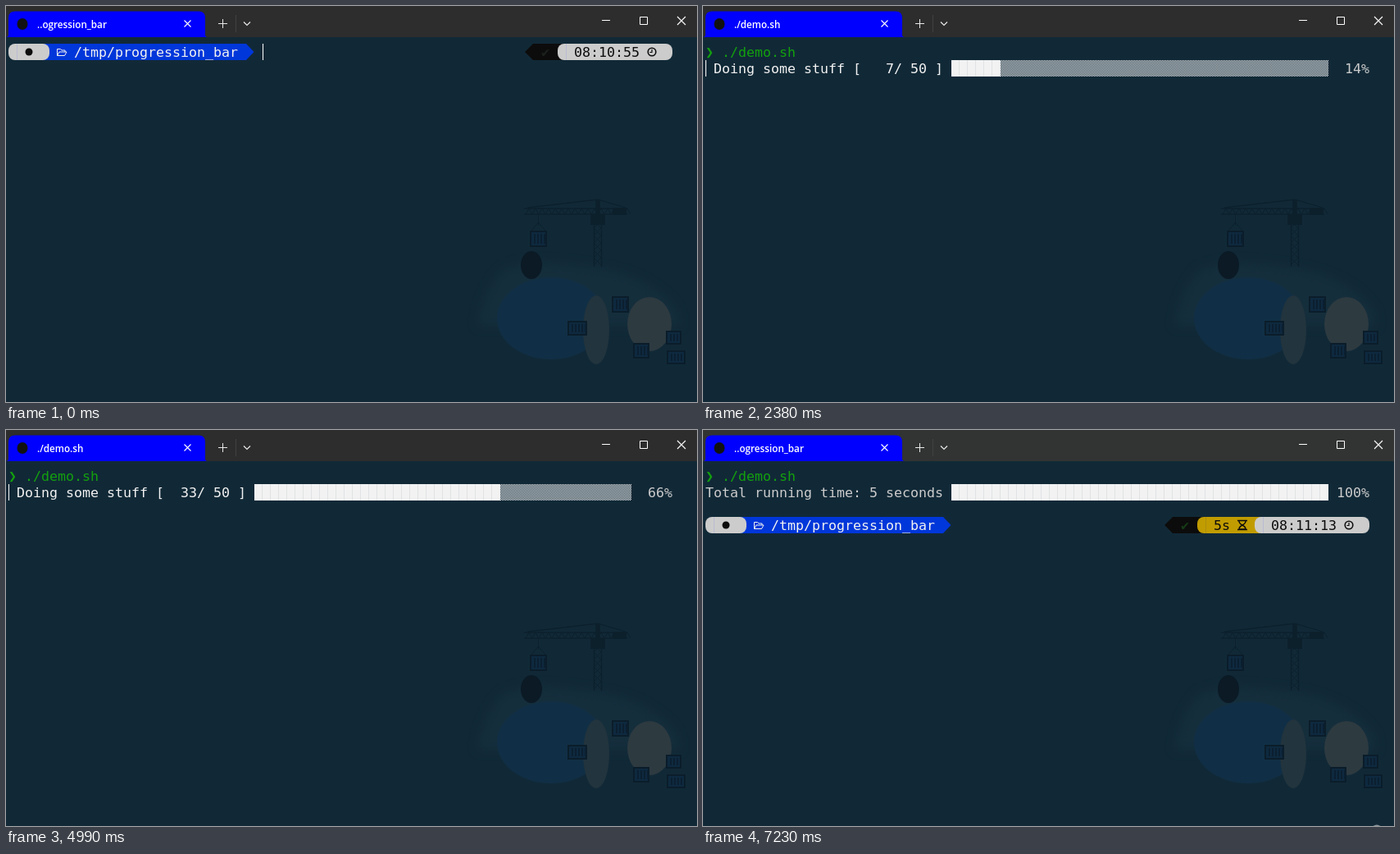
These frames come from a looping animation (843 by 483 pixels, 7.39 s). An HTML page with a canvas:

```html
<!DOCTYPE html>
<html lang="en">
<head>
<meta charset="utf-8">
<title>Progress bar</title>
<style>
  html, body { margin: 0; width: 100%; height: 100%; overflow: hidden; background: #112937; }
  canvas { display: block; }
</style>
</head>
<body>
<canvas id="stage" width="843" height="483"></canvas>
<script>
const LOOP = 7390, CELL = 10, ROW = 20, LEFT = 3, TOP = 46;
const WHITE = '#f2f2f2', GRAY = '#cccccc', GREEN = '#13a10e', RED = '#c50f1f',
      BLUE = '#0037da', BLACK = '#0c0c0c', YELLOW = '#c19c00', BACK = '#112937';
const COMMAND = './demo.sh';
const KEYS = [60, 260, 460, 660, 760, 860, 1240, 1440, 1520];
const START = 1780, SUMMARY = 6825, PROMPT = 6890, BLUR = 7230;

// Bursts of counter ticks: first time, last time, ticks
const BURSTS = [
  [1780, 2040, 4], [2180, 2450, 4], [2590, 3060, 6], [3200, 3660, 6], [3810, 4460, 8],
  [4600, 4990, 5], [5130, 5190, 2], [5330, 5600, 4], [5740, 5890, 3], [6030, 6210, 3],
  [6360, 6430, 2], [6570, 6620, 2], [6760, 6760, 1]
];
const ticks = BURSTS.flatMap(([a, b, n]) =>
  Array.from({ length: n }, (_, i) => a + (b - a) * i / Math.max(1, n - 1)));

const ctx = document.getElementById('stage').getContext('2d');
const col = c => LEFT + c * CELL;
const row = r => TOP + r * ROW;
const passed = (times, t) => times.filter(s => s <= t).length;

function rect(x, y, w, h, color) {
  ctx.fillStyle = color;
  ctx.fillRect(x, y, w, h);
}

function round(x, y, w, h, r, color) {
  ctx.fillStyle = color;
  ctx.beginPath();
  ctx.roundRect(x, y, w, h, r);
  ctx.fill();
}

function oval(x, y, rx, ry, color) {
  ctx.fillStyle = color;
  ctx.beginPath();
  ctx.ellipse(x, y, rx, ry, 0, 0, 7);
  ctx.fill();
}

function shape(d, color) {
  ctx.fillStyle = color;
  ctx.fill(new Path2D(d));
}

function line(d, color, width = 1) {
  ctx.strokeStyle = color;
  ctx.lineWidth = width;
  ctx.stroke(new Path2D(d));
}

function type(text, c, r, color) {
  ctx.font = '16.61px "DejaVu Sans Mono", monospace';
  ctx.fillStyle = color;
  [...text].forEach((ch, i) => ctx.fillText(ch, col(c + i), row(r) + 16));
}

function caret(c, r) {
  rect(col(c), row(r), 1, ROW, '#ffffff');
}

const shade = (() => {
  const tile = document.createElement('canvas');
  tile.width = tile.height = 2;
  const g = tile.getContext('2d');
  g.fillStyle = WHITE;
  g.fillRect(0, 0, 1, 1);
  g.fillRect(1, 1, 1, 1);
  return ctx.createPattern(tile, 'repeat');
})();

function crate(x, y, w, h) {
  rect(x, y, w, h, '#0e293f');
  ctx.strokeStyle = '#0b1d2a';
  ctx.lineWidth = 2;
  ctx.strokeRect(x, y, w, h);
  for (let i = 4; i < w - 1; i += 4) rect(x + i, y + 3, 2, h - 6, '#0b1f30');
}

function wallpaper() {
  rect(0, 38, 843, 445, BACK);
  ctx.save();
  ctx.filter = 'blur(6px)';
  shape('M576 390 Q580 350 606 322 Q640 308 690 316 Q784 322 818 372 L822 390 Z', '#152e3c');
  ctx.restore();

  const ink = '#0c202c';
  line('M632 247H758 M632 254H758 M717.5 254V318 M726.5 254V318 M636 246L722 236L756 246', ink, 1.3);
  for (let x = 634; x < 756; x += 8) line(`M${x} 254l4 -7l4 7`, ink);
  for (let y = 262; y < 316; y += 9) line(`M717 ${y}l9 9m0 -9l-9 9`, ink);
  rect(713, 254, 18, 13, ink);
  rect(719, 237, 6, 18, ink);
  rect(740, 246, 17, 9, ink);
  line('M649.5 255V268 M649.5 264L641 274 M649.5 264L658 274', ink);
  crate(640, 275, 19, 18);

  oval(641, 316, 13, 17, '#0b1a25');
  oval(665, 381, 66, 50, '#102f46');
  oval(720, 395, 16, 42, '#22343d');
  oval(785, 388, 27, 33, '#2d3a40');
  crate(740, 355, 19, 18);
  crate(686, 385, 22, 16);
  crate(766, 412, 18, 17);
  crate(806, 397, 17, 15);
  crate(807, 421, 21, 15);
}

function titleBar(title, focused) {
  rect(0, 0, 843, 38, focused ? '#2d2d2d' : '#323433');
  shape('M0 38Q3 38 3 35V14.5Q3 6.5 11 6.5H235Q243 6.5 243 14.5V35Q243 38 246 38Z', '#0000ff');
  oval(20, 22, 6.5, 7, '#111111');
  ctx.font = '600 11.7px "Open Sans", sans-serif';
  ctx.fillStyle = '#ffffff';
  ctx.fillText(title, 38, 27);
  line('M217.5 17.5l8 8m0 -8l-8 8', '#ffffff', 1.1);
  line('M259 21.5h11M264.5 16v11', '#e8e8e8');
  line('M280.5 11V32', '#414141');
  line('M290 19.5l4 4l4 -4', '#e8e8e8', 1.2);
  line('M727 17.5h10 M773.5 13.5h9v9h-9z', '#ffffff');
  line('M819 13l10 10m0 -10l-10 10', '#ffffff', 1.1);
}

function pill(c, end, r, color, seam) {
  round(col(c), row(r), (end - c) * CELL, ROW, 8, color);
  rect(col(c + 1), row(r), 1, ROW, seam);
}

function clockIcon(x, y) {
  ctx.strokeStyle = BLACK;
  ctx.lineWidth = 1.6;
  ctx.beginPath();
  ctx.arc(x, y, 4.8, 0, 7);
  ctx.stroke();
  line(`M${x} ${y - 3}v3.5h-2.6`, BLACK, 1.2);
}

function prompt(r, time, duration) {
  const y = row(r), mid = y + 10;
  rect(col(4), y, 250, ROW, BLUE);
  shape(`M293 ${y}L302.5 ${mid}L293 ${y + ROW}Z`, BLUE);
  pill(0, 5, r, GRAY, '#b9bcd4');
  oval(28, mid, 4.5, 4.5, BLACK);
  line(`M62.5 ${mid + 4.5}V${mid - 3.5}h4l1.5 1.5h4v2M62.5 ${mid + 4.5}l2.5 -4.5h9l-2.5 4.5z`, WHITE);
  type('/tmp/progression_bar', 8, r, WHITE);

  const tip = col(duration ? 56 : 63);
  shape(`M${tip} ${mid}l10 -10H${tip + 50}v20H${tip + 10}Z`, BLACK);
  type('✔', duration ? 58 : 65, r, duration ? '#153a16' : '#1c211d');
  if (duration) {
    round(col(60), y, 80, ROW, [8, 0, 0, 8], YELLOW);
    rect(col(61), y, 1, ROW, '#ad8e0c');
    type(duration, 62, r, BLACK);
    line(`M652 ${mid - 5.5}h12M652 ${mid + 5.5}h12` +
         `M654 ${mid - 5}q0 3 4 5q-4 2 -4 5h8q0 -3 -4 -5q4 -2 4 -5`, BLACK, 1.4);
  }
  pill(67, 81, r, GRAY, '#b9bcd4');
  type(time, 69, r, BLACK);
  clockIcon(788, mid);
}

function typing(t) {
  const n = passed(KEYS, t);
  prompt(0, '08:10:55');
  if (n) {
    const color = n > 2 && n < COMMAND.length ? RED : GREEN;
    type(COMMAND.slice(0, n), 31, 0, color);
    type(COMMAND.slice(n), 31 + n, 0, '#767676');
    if (n === 2) rect(col(31), row(0) + 18, 2 * CELL, 1, color);
  }
  caret(31 + n, 0);
}

function bar(n) {
  const full = Math.floor(46 * n / 50), y = row(1);
  rect(col(30), y, full * CELL, ROW, WHITE);
  for (let i = 1; i < full; i++) rect(col(30 + i) - 1, y, 1, ROW, '#e0e2e3');
  rect(col(30 + full), y, (46 - full) * CELL, ROW, shade);
  type(`${2 * n}%`.padStart(4), 77, 1, GRAY);
}

function running(t) {
  const n = passed(ticks, t);
  type('❯ ' + COMMAND, 0, 0, GREEN);
  bar(n);
  if (t < SUMMARY) {
    type(`Doing some stuff [ ${String(n).padStart(3)}/ 50 ]`, 1, 1, WHITE);
    caret(0, 1);
  } else {
    type('Total running time: 5 seconds', 0, 1, GRAY);
  }
  if (t >= PROMPT) {
    prompt(3, '08:11:13', '5s');
    if (t < BLUR) caret(31, 3);
  }
}

function draw(now) {
  const t = now % LOOP, busy = t >= START && t < PROMPT;
  wallpaper();
  titleBar(busy ? COMMAND : '..ogression_bar', t < BLUR);
  if (t < START) typing(t); else running(t);
  if (t >= BLUR) oval(822, 488, 7, 6.5, '#8b9399');
  requestAnimationFrame(draw);
}
requestAnimationFrame(draw);
</script>
</body>
</html>
```
